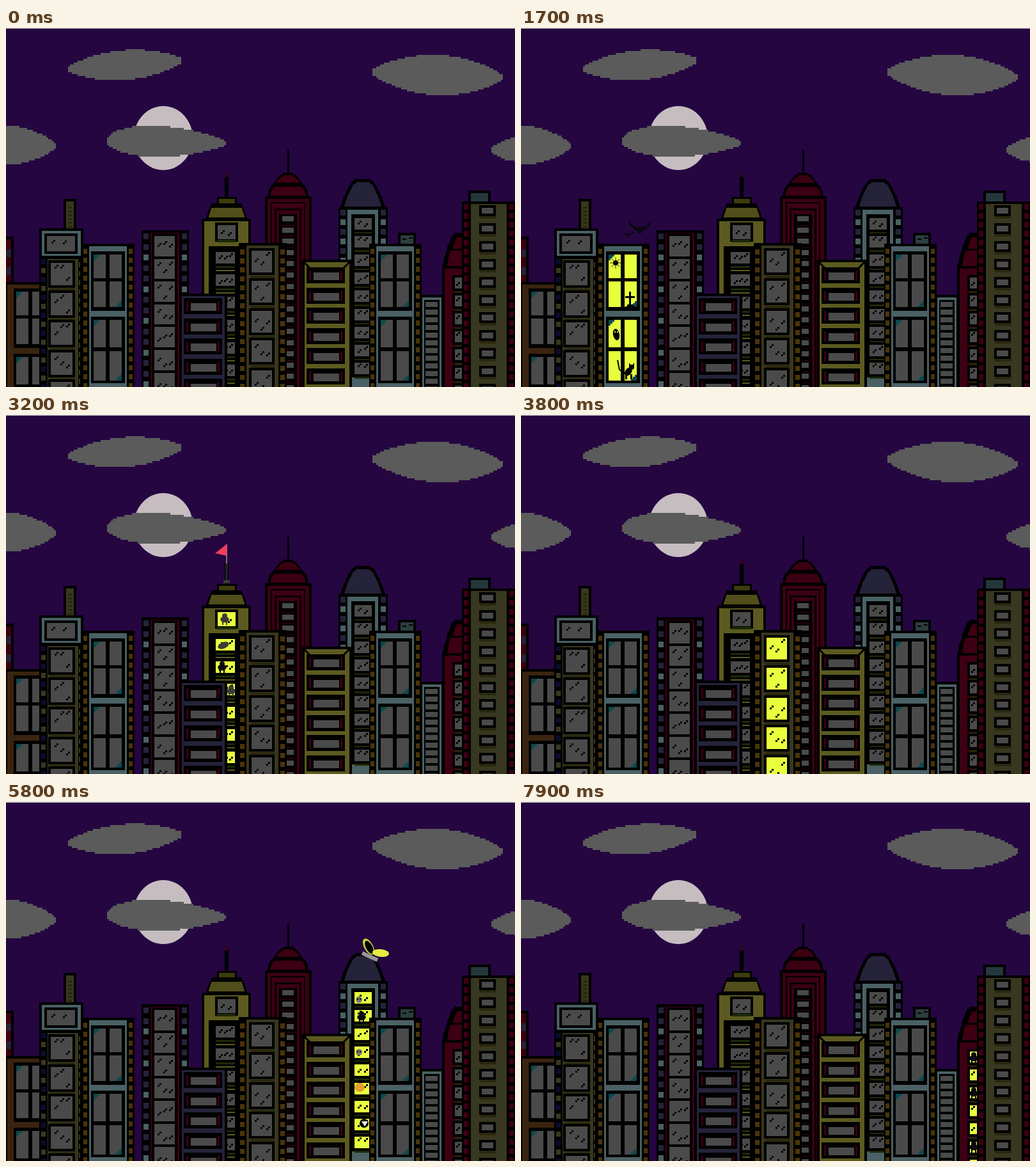
Animation, 796 px wide and 561 px high, one loop 8 s. Source, as an HTML page with a canvas:

```html
<!DOCTYPE html>
<html lang="en">
<head>
<meta charset="utf-8">
<title>Night city</title>
<style>
html, body { margin: 0; width: 100%; height: 100%; overflow: hidden; background: #250641; }
canvas { display: block; }
</style>
</head>
<body>
<canvas id="stage" width="796" height="561"></canvas>
<script>
const ctx = document.getElementById('stage').getContext('2d');
const W = 796, H = 561, LOOP = 8000;
// The lit building moves one step to the right at each of these times.
const starts = [0, 800, 1300, 1700, 2300, 2700, 3200, 3800, 4500, 5300, 5800, 6700, 7400, 7900];

const BLACK = '#000', GLASS = '#4a4a4a', LIT = '#e8ff3e', SKY = '#250641', CLOUD = '#5b5b5b',
  TEAL = '#4a6165', YELLOW = '#5c5a20', OLIVE = '#38371f', SHADE = '#29280f', MAROON = '#3c0012',
  SLATE = '#25233a', BROWN = '#3a2410', AMBER = '#4a3408', GREEN = '#1d2a08', CORNER = '#0b4a4e',
  NAVY = '#0b0b30', INK = '#0b0810', GREY = '#3c3c34';

const random = seed => Math.abs(Math.sin(seed * 12.9898) * 43758.5453) % 1;
const snap = (v, step = 3) => Math.round(v / step) * step;

function rect(color, x, y, w, h = H - y) {
  ctx.fillStyle = color;
  ctx.fillRect(x, y, w, h);
}

function box(color, x, y, w, h = 600, edge = 4) {
  rect(BLACK, x, y, w, h);
  rect(color, x + edge, y + edge, w - 2 * edge, h - 2 * edge);
}

function disc(color, x, y, rx, ry = rx, turn = 0) {
  ctx.fillStyle = color;
  ctx.beginPath();
  ctx.ellipse(x, y, rx, ry, turn, 0, 7);
  ctx.fill();
}

function line(color, width, x1, y1, x2, y2) {
  ctx.strokeStyle = color;
  ctx.lineWidth = width;
  ctx.beginPath();
  ctx.moveTo(x1, y1);
  ctx.lineTo(x2, y2);
  ctx.stroke();
}

function triangle(color, x1, y1, x2, y2, x3, y3) {
  ctx.fillStyle = color;
  ctx.beginPath();
  ctx.moveTo(x1, y1);
  ctx.lineTo(x2, y2);
  ctx.lineTo(x3, y3);
  ctx.fill();
}

// Stepped roof that widens from one half width to another.
function dome(color, cx, y, top, base, h, curve = 0.65) {
  for (let dy = 0; dy < h; dy += 3) {
    const half = Math.round(top + (base - top) * (dy / h) ** curve);
    rect(color, cx - half, y + dy, 2 * half, Math.min(3, h - dy));
  }
}

// Stepped lens between two tips; skew moves its thickest part to the left.
function cloud(x1, y1, x2, y2, up, down, skew = 1) {
  for (let x = x1; x < x2; x += 3) {
    const u = (x - x1 + 1.5) / (x2 - x1);
    const bulge = Math.sin(Math.PI * u ** skew) ** 0.75;
    const axis = y1 + (y2 - y1) * u;
    const top = snap(axis - 3 - (up - 3) * bulge);
    rect(CLOUD, x, top, 3, snap(axis + 3 + (down - 3) * bulge) - top);
  }
}

function rows(y, pitch, draw) {
  for (let i = 0; y + i * pitch < H; i++) draw(Math.round(y + i * pitch), i);
}

function pane(x, y, w, h, on, specks = 3) {
  rect(BLACK, x - 4, y - 4, w + 8, h + 8);
  rect(on ? LIT : GLASS, x, y, w, h);
  for (let k = 0; k < specks; k++) {
    const sx = Math.round(x + w * (0.17 + 0.8 * k / specks));
    const sy = Math.round(y + 4 + (h - 10) * random(x + y * 3 + k));
    rect(BLACK, sx, sy, 3, 3);
    rect(BLACK, sx + 3, sy - 3, 3, 3);
  }
}

function strip(x, y, colors, w = 7, h = 8, pitch = 14) {
  rows(y, pitch, (sy, i) => rect(colors[i % colors.length], x, sy, w, h));
}

function crossWindows(x, y, on) {
  rect(BLACK, x, y, 53, 93);
  rect(BLACK, x, y + 102, 53, 104);
  for (let i = 0; i < 4; i++) {
    const lower = i % 2, block = (i - lower) / 2;
    const py = y + 5 + block * 102 + lower * (42 + 7 * block), h = 37 + 3 * i;
    rect(on ? LIT : GLASS, x + 4, py, 19, h);
    rect(on ? LIT : GLASS, x + 29, py, 19, h);
    for (let k = 0; k < 3; k++) {
      const size = 9 - 3 * k;
      if (lower) rect(CORNER, x + 48 - size, py + h - 3 * k - 3, size, 3);
      else rect(CORNER, x + 4, py + 3 * k, size, 3);
    }
  }
}

function tealTower(x, on) {
  rect(BLACK, x, 337, 82);
  strip(x + 2, 345, [AMBER], 6);
  strip(x + 73, 345, [AMBER], 6);
  rect(TEAL, x + 11, 341, 59);
  crossWindows(x + 14, 349, on);
}

function slab(x, y, color, w, first, on) {
  box(color, x, y, w);
  rows(first, 31.5, wy => {
    rect(BLACK, x + 7, wy - 8, 60, 25);
    rect(MAROON, x + 11, wy - 3, 3, 16);
    rect(MAROON, x + 60, wy - 3, 3, 16);
    rect(on ? LIT : GLASS, x + 18, wy, 40, 12);
  });
}

function sky() {
  rect(SKY, 0, 0, W);
  rect('#c8c8cc', 0, 0, W, 1);
  disc('#c6bdc1', 246, 172, 46, 50);
  cloud(97, 64, 275, 51, 23, 24);
  cloud(573, 69, 776, 77, 31, 32);
  cloud(-87, 182, 78, 184, 31, 31);
  cloud(158, 176, 343, 180, 25, 24, 0.75);
  cloud(759, 191, 849, 191, 20, 18);
}

function leftBlock(lit) {
  rect(BLACK, 0, 326, 12);
  rect(MAROON, 0, 330, 8);
  strip(1, 346, [SLATE], 7, 12, 28);
  box(BROWN, -2, 397, 60);
  crossWindows(12, 407, lit === 1);

  box(OLIVE, 90, 267, 20, 60);
  strip(97, 279, [SHADE], 6, 3, 6);
  rect(BLACK, 52, 313, 69);
  rect(TEAL, 56, 317, 61, 39);
  pane(64, 325, 44, 24, lit === 2, 2);
  strip(55, 361, [NAVY, OLIVE]);
  rect(OLIVE, 65, 361, 48);
  rows(367, 46.6, y => {
    rect(SHADE, 69, y + 40, 38, 4);
    pane(70, y, 34, 35, lit === 2);
  });
  strip(114, 366, [OLIVE], 2);
  tealTower(119, lit === 3);
}

function pinkTower(on) {
  rect(BLACK, 212, 316, 74);
  strip(215, 321, [SLATE, SLATE, TEAL], 8, 9, 16.5);
  strip(275, 321, [SLATE, SLATE, TEAL], 8, 9, 16.5);
  rect(MAROON, 226, 320, 45);
  rect(BLACK, 229, 322, 39);
  rows(325, 35.6, y => pane(232, y, 32, 32, on));
}

function yellowTower(on) {
  rect(BLACK, 342, 232, 6, 34);
  rect(MAROON, 343, 225, 3, 8);
  box('#3d3c0c', 330, 264, 31, 16, 3);
  dome(BLACK, 345, 274, 24, 34, 25, 1);
  dome('#504e1a', 345, 281, 24, 29, 15, 1);
  box(YELLOW, 306, 298, 77);
  rect(BLACK, 317, 341, 47);
  pane(331, 308, 28, 22, on, 2);
  rect(GREEN, 330, 331, 29, 4);
  rows(350, 35.2, y => {
    pane(328, y, 30, 18, on, 3);
    rect(GREEN, 328, y + 22, 30, 3);
    rect(YELLOW, 328, y + 28, 30, 2);
  });
}

function maroonTower(on) {
  rect(BLACK, 440, 190, 3, 40);
  dome(BLACK, 441, 226, 8, 24, 18);
  dome(MAROON, 441, 230, 8, 19, 12);
  dome(BLACK, 441, 243, 24, 33, 23, 0.5);
  dome(MAROON, 441, 248, 22, 28, 14, 0.5);
  box(MAROON, 405, 263, 73);
  box(MAROON, 414, 272, 54, 600, 2);
  box(MAROON, 420, 282, 42, 600, 3);
  rect(BLACK, 427, 290, 28);
  rows(294, 17.6, y => {
    rect(MAROON, 429, y - 4, 23, 1);
    rect(on ? LIT : GLASS, 432, y, 18, 8);
  });
}

function oliveTower(on) {
  rect(BLACK, 364, 336, 75);
  strip(366, 346, [AMBER]);
  strip(429, 346, [AMBER]);
  rect(OLIVE, 376, 340, 50);
  rows(348, 46.8, y => {
    rect(SHADE, 383, y + 39, 37, 4);
    pane(384, y, 32, 34, on);
  });
}

function blueTower(on) {
  dome(BLACK, 558, 236, 13, 36, 45);
  dome(SLATE, 558, 241, 11, 30, 38);
  rect(BLACK, 520, 280, 77);
  strip(523, 284, [SLATE, TEAL], 8, 9, 15);
  strip(586, 284, [SLATE, TEAL], 8, 9, 15);
  rect(TEAL, 534, 284, 48);
  rect(BLACK, 540, 291, 37, 255);
  rows(297, 28.3, (y, i) => {
    if (i > 8) return;
    pane(545, y, 27, 18, on, 2);
    rect(GREEN, 545, y + 22, 27, 3);
  });
}

function rightBlock(lit) {
  rect(BLACK, 648, 417, 36);
  rect(TEAL, 651, 421, 30);
  rect(BLACK, 654, 425, 24);
  rows(428, 12, y => rect(lit === 12 ? LIT : GLASS, 656, y, 19, 8));

  dome(BLACK, 715, 320, 14, 33, 52);
  dome(MAROON, 715, 327, 10, 17, 18);
  dome(MAROON, 715, 348, 20, 25, 24);
  box(MAROON, 682, 372, 40);
  rows(390, 28.1, y => {
    pane(702, y, 11, 17, lit === 13, 1);
    rect(GREEN, 702, y + 22, 11, 3);
  });

  box('#24383c', 723, 254, 35, 24);
  rect(BLACK, 713, 271, 83);
  strip(716, 275, [MAROON], 7, 9);
  strip(787, 275, [MAROON], 7, 9);
  rect(OLIVE, 727, 275, 56);
  rows(281, 27.9, y => {
    rect(SHADE, 741, y + 13, 26, 4);
    pane(744, y, 18, 9, false, 0);
  });
}

function bat(x, y, span) {
  for (let dx = -span; dx <= span; dx++) {
    const a = Math.abs(dx) / span;
    const top = a < 0.2 ? -0.1 : -0.6 * a * a;
    const bottom = 0.5 - 0.9 * a + 0.15 * Math.abs(Math.sin(9 * a));
    rect(INK, x + dx, y + top * span, 1, (bottom - top) * span);
  }
}

// A head above a lumpy body with two legs.
function figure(x, y, color = GREY) {
  disc(color, x, y - 5, 4);
  for (const side of [-1, 1]) {
    disc(color, x + 2 * side, y + 1, 4, 5, side);
    rect(color, x + 3 * side - 1, y + 2, 2, 7);
  }
}

function eyes(color, x, y) {
  rect(color, x - 3, y, 2, 2);
  rect(color, x + 1, y, 2, 2);
}

function cat(x, y) {
  disc(BLACK, x, y, 5, 7, 0.6);
  disc(BLACK, x + 5, y - 7, 4);
  for (const side of [-1, 1]) {
    triangle(BLACK, x + 5, y - 8, x + 5 + 4 * side, y - 14, x + 5 + 4 * side, y - 7);
    rect(BLACK, x - 1 + 4 * side, y + 4, 3, 8);
  }
  line(BLACK, 2, x - 4, y + 4, x - 14, y - 3);
  line(BLACK, 2, x - 14, y - 3, x - 17, y - 18);
}

function plane(x, y, k) {
  line('#27434b', 2 * k, x - 16 * k, y + 6 * k, x + 24 * k, y - 8 * k);
  line('#1d5f70', 5 * k, x - 10 * k, y + 3 * k, x + 8 * k, y - 2 * k);
}

const scenes = {
  3() {
    bat(185, 312, 17);
    bat(167, 322, 8);
    for (let i = 0; i < 4; i++) {
      const dx = 9 * Math.cos(i * Math.PI / 4), dy = 9 * Math.sin(i * Math.PI / 4);
      line('#33330f', 1, 148 - dx, 367 - dy, 148 + dx, 367 + dy);
    }
    disc(BLACK, 148, 367, 4);
    rect(BLACK, 169, 412, 3, 22);
    rect(BLACK, 163, 419, 15, 3);
    dome(BLACK, 171, 432, 5, 9, 6);
    disc(BLACK, 149, 479, 5, 9, -0.2);
    eyes(LIT, 149, 474);
    cat(168, 537);
  },
  6() {
    rect('#77747a', 344, 203, 2, 32);
    rect('#242024', 343, 232, 4, 28);
    rect(GREY, 340, 258, 10, 5);
    triangle('#ef3d5c', 346, 201, 345, 220, 327, 216);
    figure(342, 319);
    disc(GREY, 340, 360, 9, 5, -0.4);
    figure(338, 394, INK);
    figure(352, 431);
  },
  8() {
    disc('#683b2b', 470, 221, 32, 12, -0.6);
    plane(531, 215, 1);
    plane(487, 242, 0.8);
    rect('#8c4030', 511, 223, 5, 4);
    disc('#d66a16', 467, 261, 4, 6, -0.5);
    disc('#ffc342', 466, 259, 2, 3);
  },
  10() {
    disc('#c5cc3b', 567, 226, 7, 14, -0.5);
    disc(BLACK, 568, 227, 5, 11, -0.5);
    disc('#e4ed40', 586, 236, 13, 6, 0.1);
    line('#96969a', 6, 557, 236, 581, 247);
    for (const y of [309, 391]) {
      disc('#77756c', 552, y, 5);
      eyes(BLACK, 552, y - 2);
    }
    figure(556, 336, INK);
    disc('#e3a02b', 553, 446, 8, 7);
    disc(BLACK, 560, 502, 7);
    triangle('#f0f0ea', 556, 499, 566, 499, 561, 507);
  },
  11() {
    bat(596, 368, 7);
    disc(BLACK, 617, 369, 5);
    disc(LIT, 618, 367, 3);
    dome(BLACK, 597, 420, 4, 7, 18);
    disc('#6d6d70', 598, 428, 4);
    for (let d = 0; d < 9; d += 4) line(BLACK, 2, 610, 414 + d, 629, 432 + d * 0.7);
    disc('#8a8e2a', 623, 467, 7);
    disc(LIT, 623, 466, 5);
    eyes(BLACK, 623, 465);
    dome(BLACK, 601, 527, 5, 14, 12);
    figure(597, 541, BLACK);
    figure(610, 541, BLACK);
  },
  13() {
    for (const y of [400, 455, 539]) figure(708, y, INK);
  }
};

function draw(lit) {
  sky();
  leftBlock(lit);
  pinkTower(lit === 4);
  yellowTower(lit === 6);
  slab(271, 415, SLATE, 75, 430, lit === 5);
  maroonTower(lit === 8);
  oliveTower(lit === 7);
  blueTower(lit === 10);
  slab(463, 362, YELLOW, 78, 382, lit === 9);
  line(BLACK, 3, 465, 365, 475, 375);
  line(BLACK, 3, 538, 365, 528, 375);
  box('#2c3d3e', 613, 320, 28, 24);
  rect(BLACK, 620, 329, 6, 2);
  rect(BLACK, 630, 327, 6, 2);
  tealTower(568, lit === 11);
  rightBlock(lit);
  scenes[lit]?.();
}

let shown = -1;
function tick() {
  const time = performance.now() % LOOP;
  const lit = starts.filter(start => start <= time).length - 1;
  if (lit !== shown) draw(shown = lit);
  requestAnimationFrame(tick);
}
tick();
</script>
</body>
</html>
```
